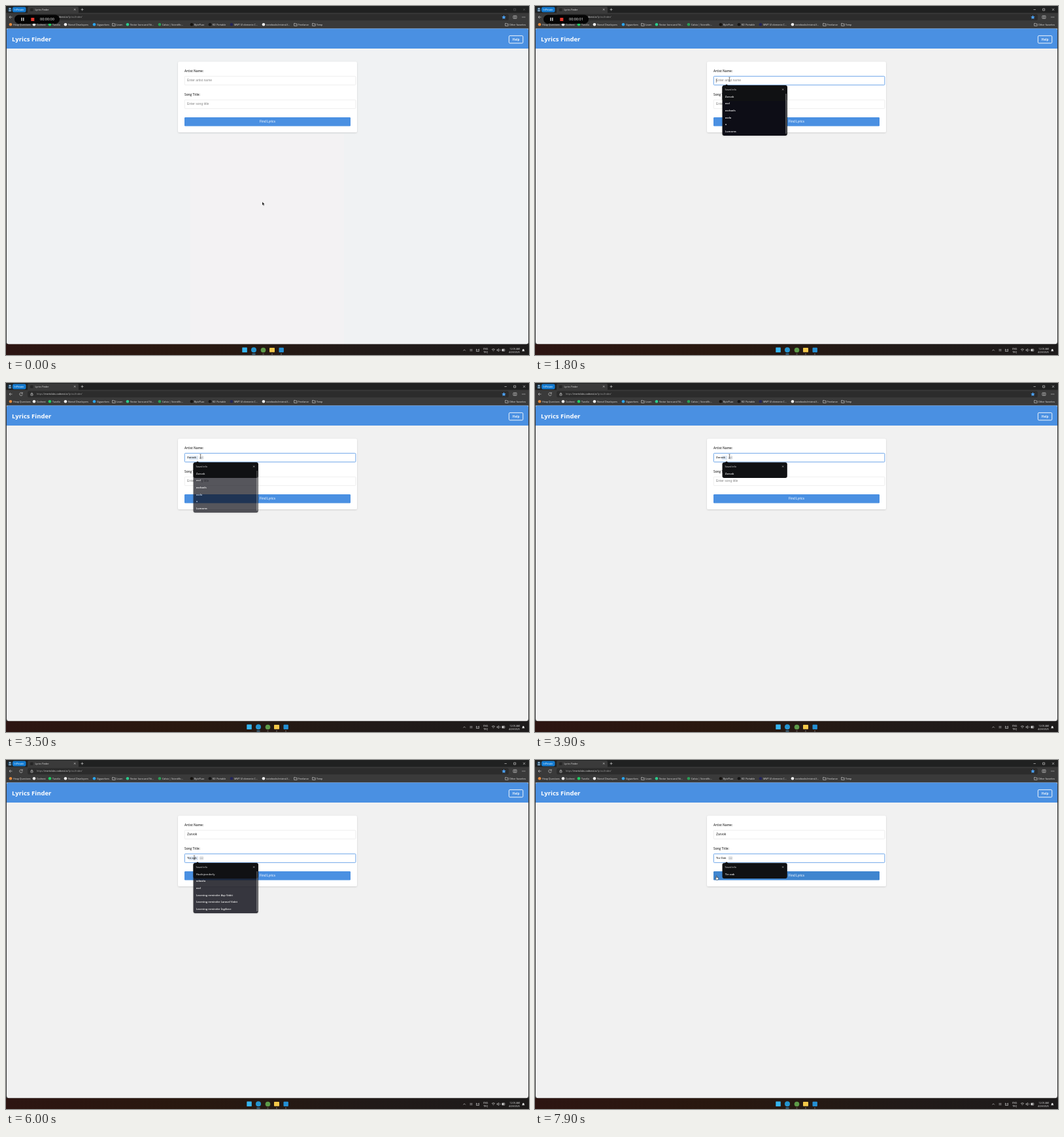
These frames come from a looping animation (800 px wide and 533 px high, 8000 ms). An HTML page:

```html
<!DOCTYPE html>
<html lang="en">
<head>
<meta charset="utf-8">
<title>Lyrics Finder</title>
<style>
  html, body { margin: 0; width: 100%; height: 100%; overflow: hidden; background: #202020; }
  svg { display: block; width: 100vw; height: 100vh; }
  text { font: 3.6px "Open Sans", "Noto Sans", sans-serif; fill: #e8e8e8; white-space: pre; }
  .title { font-size: 9.5px; font-weight: 700; fill: #fff; }
  .label { font-size: 4.8px; font-weight: 600; fill: #333; }
  .input { font: 5px "Liberation Sans", Arial, sans-serif; fill: #222; }
  .hint { fill: #858585; }
  .preview { font-size: 4.2px; font-weight: 600; fill: #222; }
  .row { font-size: 4.1px; font-weight: 600; fill: #f4f4f4; }
  .timer { font-size: 5.5px; fill: #fff; }
  .line { fill: none; stroke: #ddd; stroke-width: .6; }
</style>
</head>
<body>
<svg viewBox="0 0 800 533" preserveAspectRatio="none">
  <defs>
    <linearGradient id="bar">
      <stop stop-color="#2d1512"/><stop offset=".35" stop-color="#29180f"/>
      <stop offset=".7" stop-color="#211a18"/><stop offset="1" stop-color="#1d1b1b"/>
    </linearGradient>
    <filter id="shadow" x="-10%" y="-10%" width="120%" height="125%">
      <feDropShadow dx="0" dy=".8" stdDeviation="1.2" flood-opacity=".16"/>
    </filter>
  </defs>

  <!-- browser frame -->
  <rect width="800" height="533" fill="#202121"/>
  <rect y="10.5" width="800" height="30" fill="#3a3a3a"/>
  <rect y="40" width="800" height="477" fill="#343434"/>
  <path d="M33 11V3q0-2 2-2h74q2 0 2 2v8z" fill="#3a3a3a"/>
  <circle cx="6" cy="5.5" r="3.4" fill="#24435c"/>
  <circle cx="6" cy="4.3" r="1.2" fill="#a8c6dc"/><path d="M3.7 8q2.3-3.4 4.6 0z" fill="#a8c6dc"/>
  <rect x="10" y="1.5" width="20.5" height="8" rx="2" fill="#147bd1"/>
  <text x="12.5" y="6.9" style="fill:#fff">InPrivate</text>
  <rect x="37" y="3.5" width="4.5" height="4.5" rx="1" fill="#262626"/>
  <text x="44.5" y="6.9">Lyrics Finder</text>
  <path class="line" d="M104 4.2l2.4 2.4m0-2.4l-2.4 2.4M114.6 5.4h4m-2-2v4"/>
  <path class="line" id="windowButtons" d="M762.5 5.5h3.4M776.7 4h3v3h-3zM791 3.8l3.2 3.2m0-3.2l-3.2 3.2"/>
  <rect x="33" y="12.3" width="736" height="9.6" rx="2.5" fill="#2c2c2c"/>
  <path class="line" d="M9.5 17h-4.5m2-2l-2 2 2 2M25 15.8a2.3 2.3 0 1 0 .3 1.7M25.2 14.2v1.8h-1.8"/>
  <path class="line" d="M38 16.6h3v2.4h-3zM38.6 16.6v-1q.9-1.5 1.8 0v1"/>
  <text y="18.4"><tspan x="47" fill="#aaa">https://</tspan><tspan>mertolaks.codnest.io</tspan><tspan fill="#aaa">/lyrics-finder/</tspan></text>
  <path d="M761.5 14l1 2 2.2.3-1.6 1.5.4 2.2-2-1-2 1 .4-2.2-1.6-1.5 2.2-.3z" fill="#4ba0f4"/>
  <path class="line" d="M776 15h5v4h-5zM778.5 15v4"/>
  <path d="M789.5 17h.9m1 0h.9m1 0h.9" stroke="#ddd"/>
  <g id="bookmarks"></g>

  <!-- page -->
  <path d="M1 34.5h798v478q0 4-4 4H5q-4 0-4-4z" fill="#f1f1f1"/>
  <g id="firstTint">
    <path d="M1 65h798v447.5q0 4-4 4H5q-4 0-4-4z" fill="#f0f2f3"/>
    <rect x="282" y="195" width="235" height="321" fill="#f3f2f3"/>
  </g>
  <path d="M1 65V37q0-2.5 2.5-2.5h793q2.5 0 2.5 2.5v28z" fill="#4a90e2"/>
  <text class="title" x="9" y="53.8">Lyrics Finder</text>
  <rect x="769.4" y="45.4" width="21.4" height="11.4" rx="1.5" fill="none" stroke="#fff" stroke-width=".9"/>
  <text x="774.8" y="52.7" style="font-size:4.8px;font-weight:600;fill:#fff">Help</text>
  <rect x="263" y="85" width="274" height="108" rx="2.5" fill="#fff" filter="url(#shadow)"/>
  <text class="label" x="273" y="100.7">Artist Name:</text>
  <text class="label" x="273" y="136.5">Song Title:</text>
  <g id="fields"></g>
  <rect id="button" x="273" y="170" width="254" height="13.5" rx="1.3"/>
  <text class="input" x="400" y="178.4" text-anchor="middle" style="fill:#fff">Find Lyrics</text>
  <g id="menus"></g>
  <g id="tooltip">
    <rect x="300.5" y="116.7" width="43.5" height="7.6" fill="#2b2b2b" stroke="#777" stroke-width=".5"/>
    <text x="302.8" y="121.8" style="font-size:3.4px">Please fill out this field.</text>
  </g>

  <!-- taskbar -->
  <rect y="516.5" width="800" height="16.5" fill="url(#bar)"/>
  <g id="apps">
    <rect x="368.3" y="521.5" width="7.5" height="7.5" rx=".6" fill="#35b5f1"/>
    <circle cx="386" cy="525.3" r="4" fill="#2594cf"/>
    <circle cx="400.5" cy="525.5" r="3.8" fill="#5d9a48"/>
    <rect x="410" y="522" width="8" height="6.8" rx=".8" fill="#f4c84a"/>
    <rect x="424.5" y="521.7" width="7.4" height="7.4" rx="1" fill="#258fd3"/>
    <path d="M399.5 531.5h2m11.5 0h2m12 0h2" stroke="#888" stroke-width=".8"/>
    <path d="M383.5 531.5h5" stroke="#4cb4f0" stroke-width=".9"/>
  </g>
  <path class="line" d="M699.5 526.5l1.7-1.7 1.7 1.7M709.5 524.5h4m-4 2h4M719.5 524v3.5h4V524l-2 1.8z"/>
  <path class="line" d="M743 524.7q2.5-2.4 5 0m-4 1.3q1.5-1.3 3 0m-1.5 1.2v.5M751 524.8h1.2l1.5-1.3v4l-1.5-1.3H751zM755.5 524.5q1.2 1 0 2M758.8 524h4v3h-4z"/>
  <path d="M759 524.2h2.5v2.6H759z" fill="#ddd"/>
  <text x="733.7" y="525" text-anchor="middle">ENG</text>
  <text x="733.7" y="530" text-anchor="middle">TRQ</text>
  <text x="786" y="525" text-anchor="end">12:06 AM</text>
  <text x="786" y="530" text-anchor="end">4/28/2025</text>
  <path d="M789 527.2h4.5l-.8-1v-1.2q-1.4-2.5-2.8 0v1.2z" fill="#ddd"/>

  <g id="recorder">
    <rect x="13" y="13.5" width="69" height="13.5" rx="6.5" fill="#050505"/>
    <path d="M24 17.8v5m2.8-5v5" stroke="#fff" stroke-width="1.2"/>
    <rect x="38.3" y="17.9" width="5" height="5" rx=".5" fill="#e5372d"/>
    <text class="timer" id="timer" x="52" y="22.3"></text>
  </g>
  <g id="pointer">
    <path id="arrow" d="M0 0v5.2l1.2-1 .9 2 .9-.4-.9-1.9h1.6z" fill="#111" stroke="#fff" stroke-width=".3"/>
    <path id="beam" d="M-1.3-3h2.6M0-3v6m-1.3 0h2.6" fill="none" stroke="#444" stroke-width=".6"/>
    <path id="hand" d="M-.4 0q.6-.6 1 0v2.2l2.5.7v1.7L2.3 6H-.3l-1.7-2.4.6-.5 1 .8z" fill="#fff" stroke="#111" stroke-width=".5"/>
  </g>
</svg>

<script>
const LOOP = 8000;
const $ = id => document.getElementById(id);
const show = (id, on) => $(id).style.display = on ? '' : 'none';
const clamp = v => Math.min(1, Math.max(0, v));
const ramp = (t, from, to) => clamp((t - from) / (to - from));
const smooth = p => p * p * (3 - 2 * p);
const mix = (a, b, p) => a + (b - a) * p;

// Bookmark bar: x, name, icon colour (none means a folder)
const bookmarks = [
  [7, 'Heap Questions', '#e58a3c'], [43, 'Codnest', '#eee'], [67, 'Tunelio', '#1fcf62'],
  [91, 'Norvel Developers', '#eee'], [135, 'Gigworkers', '#2ba4ef'], [165, 'Learn'],
  [186, 'Vector Icons and Sti...', '#2bcb8c'], [235, 'Calvio | Scientific...', '#2a9d55'],
  [284, 'BytePuzz', '#15120f'], [312, 'RZ: Portable', '#151515'], [345, 'MWT UI elements C...', '#22235a'],
  [394, 'notebooks/mistral-f...', '#eee'], [443, 'Freelance'], [471, 'Temp'], [766, 'Other favorites']
];
$('bookmarks').innerHTML = bookmarks.map(([x, name, color]) =>
  (color ? `<circle cx="${x}" cy="28.3" r="2.3" fill="${color}"/>`
         : `<path class="line" d="M${x - 2.3} 26.5h1.6l.7.8h2.2v3h-4.5z"/>`) +
  `<text x="${x + 4}" y="29.7">${name}</text>`).join('');

// focus/blur, menu open/close, first key and key interval are times in ms
const fields = [
  { id: 'artist', y: 107, hint: 'Enter artist name', value: 'Zarvok', suggestion: 'Zarvok',
    focus: 1000, blur: 5800, open: 1050, close: 4600, key: 3400, interval: 190, accept: 4600,
    rows: ['Zarvok', 'asd', 'asdsads', 'asda', 'a', 'Lumarra'] },
  { id: 'song', y: 143, hint: 'Enter song title', value: 'Tin Oak', suggestion: 'Tin oak',
    focus: 5800, blur: LOOP, open: 5800, close: LOOP, key: 5940, interval: 200, accept: LOOP,
    rows: ['Hush yonderly', 'adasda', 'asd', 'Learning reminder Asp Vakti',
           'Learning reminder Laravel Vakti', 'Learning reminder İngilizce'] }
];

const fieldMarkup = ({ id, y, hint, value }) => `
  <rect id="${id}Box" x="273.3" y="${y + .3}" width="261.6" height="13.4" rx="1.2" fill="#fff"/>
  <text id="${id}Hint" class="input hint" x="277" y="${y + 8.4}">${hint}</text>
  <text id="${id}Value" class="input" x="277" y="${y + 8.4}">${value}</text>
  <path id="${id}Caret" d="M277.3 ${y + 4}v6" stroke="#222" stroke-width=".5"/>
  <g id="${id}Preview">
    <rect id="${id}Select" y="${y + 4.2}" height="5.8" fill="#dce6f2"/>
    <text id="${id}Typed" class="preview" x="277" y="${y + 8.3}"></text>
    <rect x="296" y="${y + 4.6}" width="6" height="4.6" rx="1.2" fill="#e3e6ea" stroke="#bbb" stroke-width=".3"/>
    <path d="M297.5 ${y + 7}h.7m.5 0h.7m.5 0h.7" stroke="#555" stroke-width=".7"/>
  </g>`;

const menuMarkup = ({ id, y, rows, suggestion }) => {
  const top = y + 14;
  const row = (text, i) => `<text class="row" x="290.8" y="${top + 18.5 + i * 10.7}">${text}</text>`;
  return `<g id="${id}Menu">
    <g id="${id}Rest">
      <rect x="286.5" y="${top + .3}" width="99.3" height="76.7" rx="3" fill="#101113" filter="url(#shadow)"/>
      ${rows.map((text, i) => i ? row(text, i) : '').join('')}
      <path d="M384 ${top + 13}v61" stroke="#888" stroke-width="1.1"/>
    </g>
    <path d="M290 ${top + 1}l3-2.5 3 2.5z" fill="#101113"/>
    <rect x="286.5" y="${top + .3}" width="99.3" height="23.7" rx="3" fill="#101113"/>
    <path d="M384 ${top + 13}v11" id="${id}Scroll" stroke="#888" stroke-width="1.1"/>
    <text x="290.5" y="${top + 8}">Saved info</text>
    <path class="line" d="M378.2 ${top + 5.5}l2 2m0-2l-2 2"/>
    <g id="${id}First">${row(rows[0], 0)}</g>
    <g id="${id}Match">${row(suggestion, 0)}</g>
  </g>`;
};
$('fields').innerHTML = fields.map(fieldMarkup).join('');
$('menus').innerHTML = fields.map(menuMarkup).join('');

function drawField(f, t) {
  const focused = t >= f.focus && t < f.blur;
  const started = t >= f.key;
  const accepted = t >= f.accept;
  const box = $(f.id + 'Box');
  box.setAttribute('stroke', focused ? '#4a90e2' : '#ddd');
  box.setAttribute('stroke-width', focused ? .8 : .5);
  show(f.id + 'Hint', !started);
  show(f.id + 'Value', accepted);
  show(f.id + 'Caret', focused && !started);
  show(f.id + 'Preview', started && !accepted);

  if (started) {
    const count = Math.min(f.value.length, Math.floor((t - f.key) / f.interval) + 1);
    const done = count / f.value.length;
    $(f.id + 'Typed').textContent = f.value.slice(0, count) + f.suggestion.slice(count);
    $(f.id + 'Select').setAttribute('x', 277 + 17 * done);
    $(f.id + 'Select').setAttribute('width', 17 * (1 - done));
  }

  const filtered = ramp(t, f.key, f.key + 330);
  show(f.id + 'Menu', t >= f.open && t < f.close);
  for (const part of ['Rest', 'First', 'Scroll']) $(f.id + part).style.opacity = 1 - filtered;
  $(f.id + 'Match').style.opacity = filtered;
}

function drawPointer(t) {
  const toArtist = smooth(ramp(t, 50, 600));
  const toSong = smooth(ramp(t, 4850, 5600));
  const toButton = smooth(ramp(t, 7400, 7850));
  const x = mix(mix(mix(392, 297.5, toArtist), 288, toSong), 277.5, toButton);
  const y = mix(mix(mix(299, 112, toArtist), 149, toSong), 177, toButton);
  const overField = fields.some(f => y > f.y && y < f.y + 14);
  const overButton = x < 527 && y > 170 && y < 183.5;
  $('pointer').setAttribute('transform', `translate(${x} ${y})`);
  show('beam', overField);
  show('hand', overButton);
  show('arrow', !overField && !overButton);
}

function draw(t) {
  fields.forEach(f => drawField(f, t));
  drawPointer(t);
  show('firstTint', t < 900);
  $('windowButtons').style.opacity = t < 900 ? .3 : 1;
  show('tooltip', t >= 2500 && t < 3400);
  $('apps').setAttribute('transform', `translate(${-7 * (1 - smooth(ramp(t, 100, 500)))} 0)`);

  $('timer').textContent = '00:00:0' + Math.floor(t / 1000);
  $('recorder').setAttribute('transform', `translate(${-84 * ramp(t, 2700, 3500) ** 2} 0)`);

  const hover = ramp(t, 7800, 8000);
  const channels = [mix(74, 53, hover), mix(144, 122, hover), mix(226, 189, hover)];
  $('button').setAttribute('fill', `rgb(${channels.map(Math.round)})`);
}

function frame() {
  draw(performance.now() % LOOP);
  requestAnimationFrame(frame);
}
frame();
</script>
</body>
</html>
```
